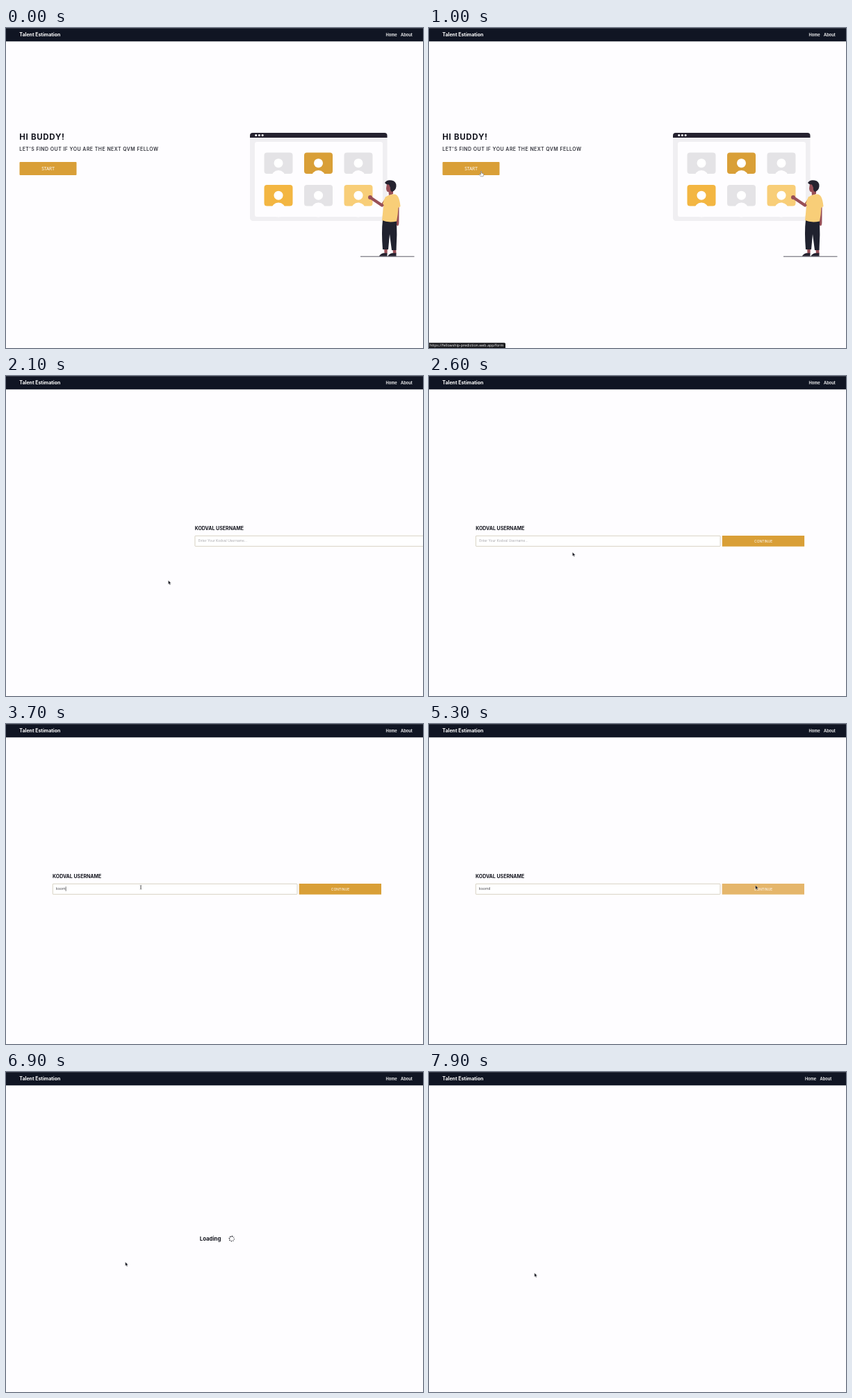
Recreate the animation shown at these times as an HTML page. Size 600 px wide and 461 px high, loop 8 s.

```html
<!DOCTYPE html>
<html lang="en">
<head>
<meta charset="utf-8">
<title>Talent Estimation</title>
<style>
  html, body { margin: 0; width: 100%; height: 100%; overflow: hidden; background: #fefdff; }
  svg { display: block; width: 100%; height: 100%; }
  text { font-family: Inter, sans-serif; fill: #15161f; white-space: pre; }
  .bold { font-weight: 700; }
  .nav { font-size: 5.7px; font-weight: 600; fill: #fff; }
  .plain { font-family: "Open Sans", sans-serif; fill: #fff; }
  .middle { text-anchor: middle; }
</style>
</head>
<body>
<svg viewBox="0 0 600 461">
  <defs>
    <g id="card">
      <rect width="41" height="30.5" rx="4"/>
      <circle cx="20.5" cy="15.2" r="6.5" fill="#fff"/>
      <circle cx="20.5" cy="36" r="10.4" fill="#fefdff"/>
    </g>
  </defs>
  <rect width="600" height="461" fill="#fefdff"/>

  <g id="home">
    <text class="bold" x="19.3" y="161" font-size="11.5" letter-spacing=".7">HI BUDDY!</text>
    <text x="19.3" y="177.4" font-size="6.9" font-weight="600" letter-spacing=".5" style="fill:#33343d">LET'S FIND OUT IF YOU ARE THE NEXT QVM FELLOW</text>
    <rect x="19.5" y="193" width="82" height="19" rx="1" fill="#d99f37"/>
    <text class="plain middle" x="60.5" y="205" font-size="6.6">START</text>

    <rect x="351" y="151" width="197.5" height="127" rx="4.5" fill="#f0eff2"/>
    <rect x="358" y="164" width="184" height="108" rx="3" fill="#fefdff"/>
    <path d="M351 158v-3q0-4 4-4h189.500q4 0 4 4v3z" fill="#25222f"/>
    <g fill="#fff">
      <circle cx="359.7" cy="154.5" r="1.5"/>
      <circle cx="364.4" cy="154.5" r="1.5"/>
      <circle cx="369.1" cy="154.5" r="1.5"/>
    </g>
    <use href="#card" x="371.500" y="179.500" fill="#e4e3e6"/>
    <use href="#card" x="429" y="179.500" fill="#d99f37"/>
    <use href="#card" x="486.500" y="179.500" fill="#e4e3e6"/>
    <use href="#card" x="371.500" y="226" fill="#f3b642"/>
    <use href="#card" x="429" y="226" fill="#e4e3e6"/>
    <use href="#card" x="486.500" y="226" fill="#f8ce78"/>

    <g fill="#984f57">
      <path d="M544 315h5l-.5 10h-4zM556 315h5l.5 10h-4.500z"/>
      <path d="M560 256h5.600l-.2 24q0 5-2.200 5-2.200-1-1.700-6z"/>
      <path d="M548 224h9v15l-6 3-.5-6q-3 1-3.500-5z"/>
    </g>
    <path d="M545 223Q548 218 555 219.500Q562 221 561.500 228Q561 234 555.500 236Q552.500 235 553 230L551 225.500Q547 226 545 223z" fill="#25222f"/>
    <path d="M542 277Q540 293 542 319h8l2-22 3 23h6.500Q563 298 562 277z" fill="#20222f"/>
    <path d="M547 243Q552 239 559 239.500Q566 240 567.500 257L564.500 259Q564 269 562 278.500Q550 281 541 277L543 258L541 252z" fill="#f8ce78"/>
    <path d="M524 244L541 255.500L547 248" fill="none" stroke="#984f57" stroke-width="4.200" stroke-linejoin="round"/>
    <circle cx="524" cy="244" r="3" fill="#984f57"/>
    <path d="M542 253L546 243L552 244L546 258z" fill="#f8ce78"/>
    <path d="M537 328.700q1-3 6-4.500h5.500v4.500zM549.500 328.700q1-3 6-4.500h6v4.500z" fill="#25222f"/>
    <path d="M510 329.200h77.500" stroke="#4b4a55" stroke-width=".9"/>
  </g>

  <g id="form">
    <text class="bold" x="67" y="222" font-size="7">KODVAL USERNAME</text>
    <rect x="67.300" y="230.300" width="351.700" height="15" rx=".6" fill="#fff" stroke="#cfc8b4" stroke-width=".8"/>
    <text id="entry" x="72" y="239.300" font-size="5.400"></text>
    <path id="caret" d="M0 234.200v6.600" stroke="#222" stroke-width=".6"/>
    <rect id="button" x="421.700" y="230" width="118.300" height="15.600"/>
    <text class="middle" x="481" y="239.500" font-size="5" style="fill:#fff">CONTINUE</text>
  </g>

  <g id="loading">
    <text class="bold" x="278.800" y="242.700" font-size="7.800">Loading</text>
    <g id="spinner"></g>
  </g>

  <rect width="600" height="19.300" fill="#101523"/>
  <rect width="600" height=".6" fill="#4a4d58"/>
  <text class="bold" x="19.300" y="12.300" font-size="7" style="fill:#fff">Talent Estimation</text>
  <g id="links">
    <text class="nav" x="546.500" y="12">Home</text>
    <text class="nav" x="568" y="12">About</text>
  </g>

  <g id="status">
    <path d="M0 453.500h108.500q1.500 0 1.500 1.500v6H0z" fill="#17181c"/>
    <text class="plain" x="1" y="459" font-size="5.300">https://fellowship-prediction.web.app/form</text>
  </g>

  <g id="cursor">
    <path id="arrow" d="M0 0v5.600l1.300-1.200.9 2 1-.4-.9-2h1.800z" fill="#15161f" stroke="#fff" stroke-width=".3"/>
    <path id="hand" d="M-.5-.5q.7-.8 1.200 0v2.600l2.500.6q.7.300.5 1.400l-.7 2.700H-.7l-2-2.600q.2-1 1-.6l1.200.7z" fill="#fff" stroke="#55565e" stroke-width=".5"/>
    <path id="beam" d="M-1.300-2.800q1.300 0 1.300.8v4q0 .8-1.300.8M1.300-2.800Q0-2.800 0-2v4q0 .8 1.300.8" fill="none" stroke="#333" stroke-width=".5"/>
  </g>
</svg>
<script>
const LOOP = 8000;
const el = id => document.getElementById(id);
const show = (id, on) => el(id).style.display = on ? "" : "none";
const shift = (id, x, y = 0) => el(id).setAttribute("transform", `translate(${x} ${y})`);
const clamp = v => Math.min(1, Math.max(0, v));

const username = "ksomil";
const keyTimes = [3300, 3400, 3600, 3700, 3900, 4000];

// Pointer path: time, x, y
const pointerPath = [
  [100, 480, 290], [200, 400, 255], [400, 400, 255], [800, 180, 225], [1000, 75, 207],
  [1300, 75, 207], [1900, 233.5, 294.5], [2100, 233.5, 294.5], [2900, 194, 235.3],
  [4000, 194, 235.3], [4300, 380, 207], [4700, 470, 207], [4850, 469.7, 232.5],
  [5600, 469.7, 232.5], [5900, 240.8, 270.5], [6500, 175, 270], [7400, 167, 279], [7900, 151.7, 289.5]
];

function pointerAt(t) {
  const next = pointerPath.findIndex(p => p[0] > t);
  if (next < 1) return pointerPath[next < 0 ? pointerPath.length - 1 : 0].slice(1);
  const [t0, x0, y0] = pointerPath[next - 1], [t1, x1, y1] = pointerPath[next];
  const k = (t - t0) / (t1 - t0), s = k * k * (3 - 2 * k);
  return [x0 + (x1 - x0) * s, y0 + (y1 - y0) * s];
}

// Pages leave with ease-in-out and arrive on a damped spring.
function slideOut(t, start) {
  const k = clamp((t - start) / 300);
  return -600 * (k < .5 ? 2 * k * k : 1 - 2 * (1 - k) ** 2);
}
function springIn(t, start) {
  const s = Math.max(0, t - start) / 1000, omega = 19, zeta = .78;
  const root = Math.sqrt(1 - zeta * zeta), phase = omega * root * s;
  return 600 * Math.exp(-zeta * omega * s) * (Math.cos(phase) + zeta / root * Math.sin(phase));
}

for (let i = 0; i < 8; i++) {
  const a = i * Math.PI / 4;
  el("spinner").insertAdjacentHTML("beforeend",
    `<circle cx="${3.5 * Math.cos(a)}" cy="${3.5 * Math.sin(a)}" r="${.6 + i * .045}" fill="#15161f"/>`);
}

function draw(t) {
  show("home", t < 1500);
  shift("home", slideOut(t, 1200));
  show("status", t >= 850 && t < 1450);

  show("form", t >= 2000 && t < 5600);
  shift("form", t < 5300 ? springIn(t, 2000) : slideOut(t, 5300));
  const typed = username.slice(0, keyTimes.filter(k => k <= t).length);
  const entry = el("entry");
  entry.textContent = typed || "Enter Your Kodval Username...";
  entry.setAttribute("font-size", typed ? 5.4 : 4.9);
  entry.style.fill = typed ? "#4a4a50" : "#a9a8ad";
  show("caret", t >= 3000 && t < 4900 && (typed.length % 6 || t % 1000 < 500));
  shift("caret", 72.4 + (typed ? entry.getComputedTextLength() : 0));
  const hover = clamp((t - 4850) / 200);
  el("button").setAttribute("fill", `rgb(${217 + 12 * hover},${159 + 23 * hover},${55 + 52 * hover})`);

  show("loading", t >= 5700 && t < 7500);
  el("spinner").setAttribute("transform", `translate(324.8 240.2) rotate(${t * .36})`);
  shift("links", t < 7500 ? 0 : -5.5);

  show("cursor", t >= 100);
  shift("cursor", ...pointerAt(t));
  const hand = t >= 900 && t < 1450, beam = t >= 2800 && t < 4080;
  show("hand", hand);
  show("beam", beam);
  show("arrow", !hand && !beam);
}

const start = performance.now();
function tick() {
  draw((performance.now() - start) % LOOP);
  requestAnimationFrame(tick);
}
tick();
</script>
</body>
</html>
```
